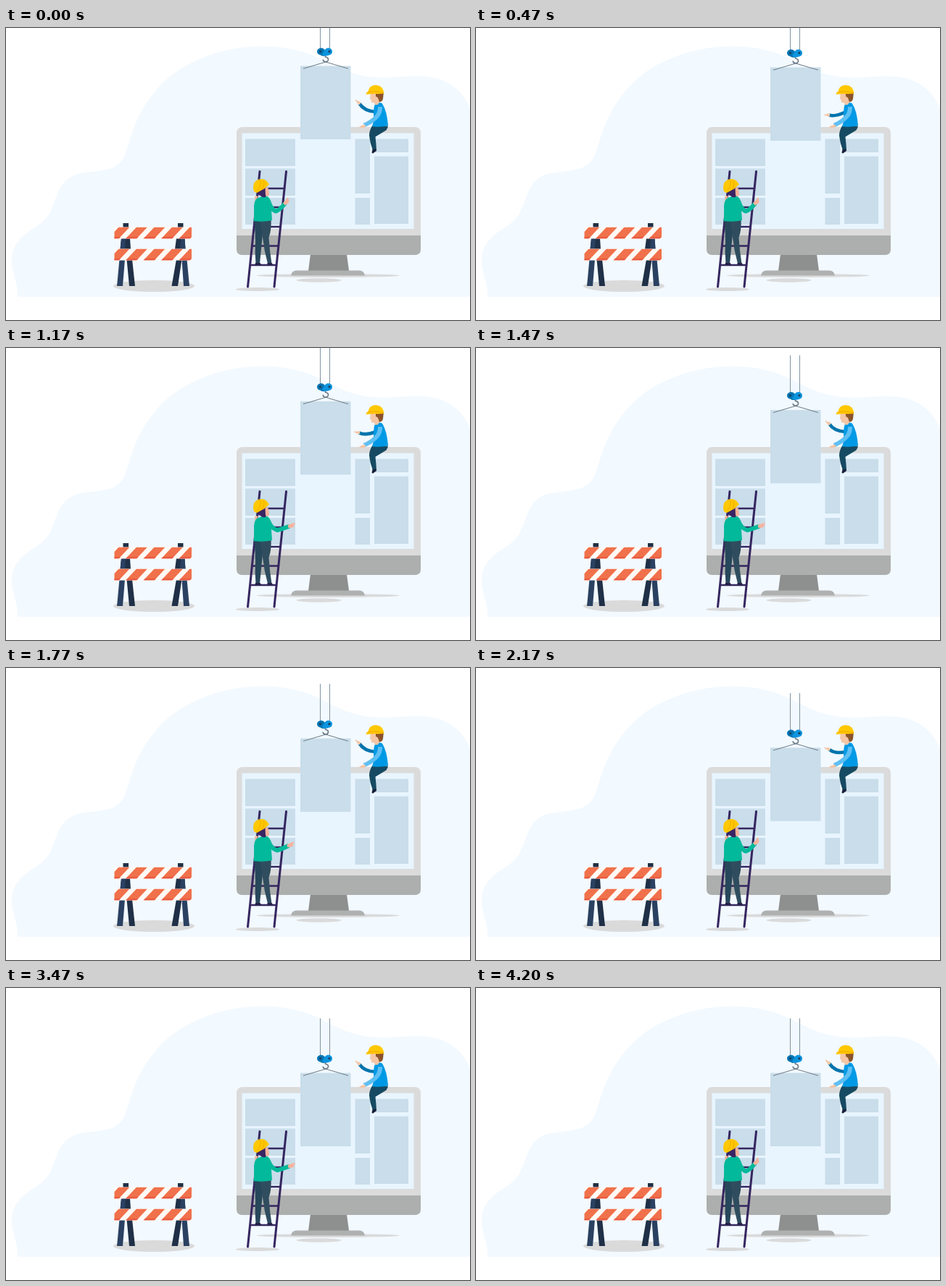
These frames come from a looping animation (640x404 px, 4.36 s). An HTML page:

```html
<!DOCTYPE html>
<html lang="en">
<head>
<meta charset="utf-8">
<title>Site under construction</title>
<style>
html, body { margin: 0; width: 100%; height: 100%; overflow: hidden; background: #fff; }
svg { display: block; width: 640px; height: 404px; }
</style>
</head>
<body>
<svg viewBox="0 0 640 404" fill="none">
  <defs>
    <clipPath id="board"><path d="M149.500 275.500H256v16H149.500z"/></clipPath>
    <g id="plank" clip-path="url(#board)">
      <path fill="#fffaf5" d="M149 275h108v17H149z"/>
      <g id="stripes" fill="#f0714b"></g>
    </g>
  </defs>

  <path fill="#f2f9ff" d="M16 372C17 352 8 342 8 321C8 300 20 288 43 274C74 255 62 218 94 203.500C118 195 148 203 162 180C172 163 176 100 240 57C298 20 383 14 440 46C472 62 490 70 530 68.500C568 65 592 65 613 78C630 89 637 102 640 113V372Z"/>

  <g fill="#dadada">
    <ellipse cx="444.500" cy="342.500" rx="98.500" ry="2.500"/>
    <ellipse cx="431.500" cy="349" rx="31" ry="2.800"/>
    <ellipse cx="204" cy="357" rx="56" ry="8"/>
    <ellipse cx="347" cy="361.500" rx="30" ry="2.500"/>
  </g>

  <!-- monitor -->
  <path fill="#8e8f8f" d="M420 313h50l3 23h-56z"/>
  <path fill="#afb1b0" d="M393 342.500q1-7 8-7h86q7 0 8 7z"/>
  <rect x="318" y="137" width="254" height="177" rx="8" fill="#dbdbdb"/>
  <path fill="#adafae" d="M318 287h254v19q0 8-8 8H326q-8 0-8-8z"/>
  <path fill="#e8f5ff" d="M325.500 145.500h237v132.500h-237z"/>
  <path fill="#c9ddea" d="M330 153.500h69V191h-69zM330 194.500h69V232h-69zM330 235h69v37h-69zM481.500 153.500H502V229h-20.500zM481.500 235H502v37h-20.500zM508 153.500h47V172h-47zM508 177.500h47V271h-47z"/>

  <!-- barricade -->
  <path fill="#2b4162" d="M156.500 320h7.500l-3 37h-8zM242.500 320h7l3.500 37h-8z"/>
  <path fill="#1f3047" d="M161.500 270h7.500v7h-7.500zM237 270h7.500v7H237zM159 291h12l1 15h-14.500zM235 291h11.500l1 15H233zM166.500 320h7.500l4 37h-8zM235 320h7.500l-5.500 37h-8.500z"/>
  <path fill="#2b4162" d="M159 291h6l-1 15h-6.500zM241 291h5.500l1 15H240z"/>
  <use href="#plank"/>
  <use href="#plank" y="30"/>

  <!-- ladder -->
  <g stroke="#35265f" stroke-linecap="round">
    <path stroke-width="3" d="M350 198.500L333.500 358M386.500 198.500L370 358"/>
    <path stroke-width="2.500" d="M348 222h36M345 248h36M342 275h36M340 301.500h36M337 328h36"/>
  </g>

  <!-- woman on the ladder -->
  <path fill="#f6b29c" d="M343 233l4-1 1 8-4 2zM354 226h8l1 5-3 3-1 3h-5z"/>
  <path fill="#27475a" d="M342.500 264h12.500q0 16-2 31l-3 31h-5.500q-1.500-16-.5-31z"/>
  <path fill="#2f4d5e" d="M350 264h15.500q1 15-3 26 1 18 4 36h-5.500q-5-18-7-36z"/>
  <path fill="#252347" d="M344 325h6.500l2 3h-9zM360.500 325h6l2 3h-8z"/>
  <path fill="#02b99b" d="M345.500 236q7-4 15-3 5 3 5 11l1.500 22q-12 3-25.500 1 1-9 .5-19 0-8 3.500-12z"/>
  <path id="sleeve" stroke="#02b99b" stroke-width="6" stroke-linejoin="round"/>
  <path id="womanHand" fill="#f6b29c" d="M-2-2.200L4-2.800 8-3.500 8.200-1.500 6-.5 6.500 1.500 3 2.800-2 2z"/>
  <path fill="#3a2463" d="M346 225l13-4q2 6 0 9l-1 4q-5 1-7-2-5-1-5-7z"/>
  <path fill="#f6b29c" d="M357.500 221h4l1.500 7-1 3.500h-4z"/>
  <path fill="#ffc800" d="M341 221q0-9 7-11.500 9-2 12.500 3.500l2.500 3.500-7 6-10 5.500q-5-1-5-7z"/>
  <path stroke="#efa800" d="M350 210q4 6-3 14M355 211q3 6-2 12"/>

  <!-- man on the monitor -->
  <path id="farArm" stroke="#0074ad" stroke-width="4.600"/>
  <path id="manHand" fill="#f4c6a5" d="M-1-1.800L3-1.700 7.500-.9 7.300.2 3.500.7 3 2-1 2z"/>
  <path fill="#164a63" d="M505 135.500h22q-1 6-6 8l-11.500 7q1 9 1.500 18l-5 1q-4-10-5-20.500 0-7 4-13.500z"/>
  <path fill="#17213a" d="M505.500 168l5-.5.500 2.500-5 3.500-1.500-1z"/>
  <path fill="#0099e5" d="M509 105q5-3 9.500-1 7 10 8.500 31-11 3-22 1 3-7 2-17 0-9 2-14z"/>
  <path stroke="#5fbff2" stroke-width="6" stroke-linejoin="round" d="M516 109q0 9-5 14-8 8-17 11.500"/>
  <path fill="#f4c6a5" d="M495 133.500l-5 1.500-3.500 2.500 7 .5 3-2zM503 88h13v13l-3 5-4 .5-1-3-4-.5-.5-4-1.500-.5z"/>
  <path fill="#8b552b" d="M510 88h11l-1 10q-1 4-5 4.500l-2-6-3-2z"/>
  <path fill="#ffc800" d="M497 92q-1-3 2.500-4 1-8 9-9 11-1 13 11.500-8 1-12 .5-5 0-12.500 1z"/>
  <path stroke="#efa800" d="M499.500 88.500q10-2 21 1"/>

  <!-- crane load -->
  <g id="crane">
    <path stroke="#8294a3" d="M433.500-23V30M446.500-23V30"/>
    <path fill="#c9ddea" d="M406 52.500h69.500V154H406z"/>
    <path stroke="#6c7a85" d="M410 56.200L441 47 472 56.200"/>
    <path stroke="#6c7a85" stroke-width="1.600" d="M440.500 38v2q4.500 1 4 4.200-1 3-4.300 2.500-3-.5-3-3.200"/>
    <path fill="#0074b2" d="M434.500 27.500q3 0 5.500 3v8q-4 1-6-1-5-1-5-5 0-4 5.500-5z"/>
    <path fill="#0c94df" d="M445 27.500q-4 0-6 4l-3 5q3 3 8 1.500 6-1 6-5.500 0-4-5-5z"/>
    <g fill="#17466a"><circle cx="433.500" cy="32.500" r="1.700"/><circle cx="446" cy="32.500" r="1.700"/></g>
  </g>
</svg>
<script>
const LOOP = 4360;
const el = id => document.getElementById(id);
const mix = (a, b, k) => a + (b - a) * k;
const mixAll = (a, b, k) => a.map((v, i) => mix(v, b[i], k));

// sine ease from 0 to 1 between two times
const ease = (t, from, to) => {
  const u = Math.min(1, Math.max(0, (t - from) / (to - from)));
  return (1 - Math.cos(Math.PI * u)) / 2;
};

const place = (id, x, y, angle) =>
  el(id).setAttribute('transform', `translate(${x} ${y}) rotate(${angle})`);

for (let i = 0; i < 6; i++) {
  const x = 131 + i * 24.5;
  el('stripes').innerHTML += `<path d="M${x} 275.500h15l-15 16h-15z"/>` +
    `<path fill="#e95a40" d="M${x - 12.5} 289h15l-2.500 2.500h-15z"/>`;
}

function draw(t) {
  el('crane').setAttribute('transform', `translate(0 ${65 * ease(t, 190, 2720)})`);

  // man's arm: 0 raised, 1 lowered
  const low = ease(t, 0, 600) - ease(t, 955, 1555) + ease(t, 1885, 2485) - ease(t, 2960, 3560);
  const [cx, cy, wx, wy, turn] = mixAll([494, 115, 487.5, 104.5, 226], [496, 124, 487, 122.5, 182], low);
  el('farArm').setAttribute('d', `M510 116Q${cx} ${cy} ${wx} ${wy}`);
  place('manHand', wx, wy, turn);

  // woman's arm: 0 bent, 1 stretched out
  const out = ease(t, 420, 960) - ease(t, 1600, 2190) + ease(t, 2470, 3010) - ease(t, 3590, 4200);
  const [ex, ey, hx, hy, tilt] = mixAll([372, 254.5, 385, 242.5, -42], [374, 253, 391, 246.5, -10], out);
  el('sleeve').setAttribute('d', `M362 239Q365 ${ey - 4} ${ex} ${ey - 1}Q${ex + 5} ${ey - 2} ${hx} ${hy}`);
  place('womanHand', hx, hy, tilt);
}

const start = performance.now();
function tick() {
  draw((performance.now() - start) % LOOP);
  requestAnimationFrame(tick);
}
tick();
</script>
</body>
</html>
```
